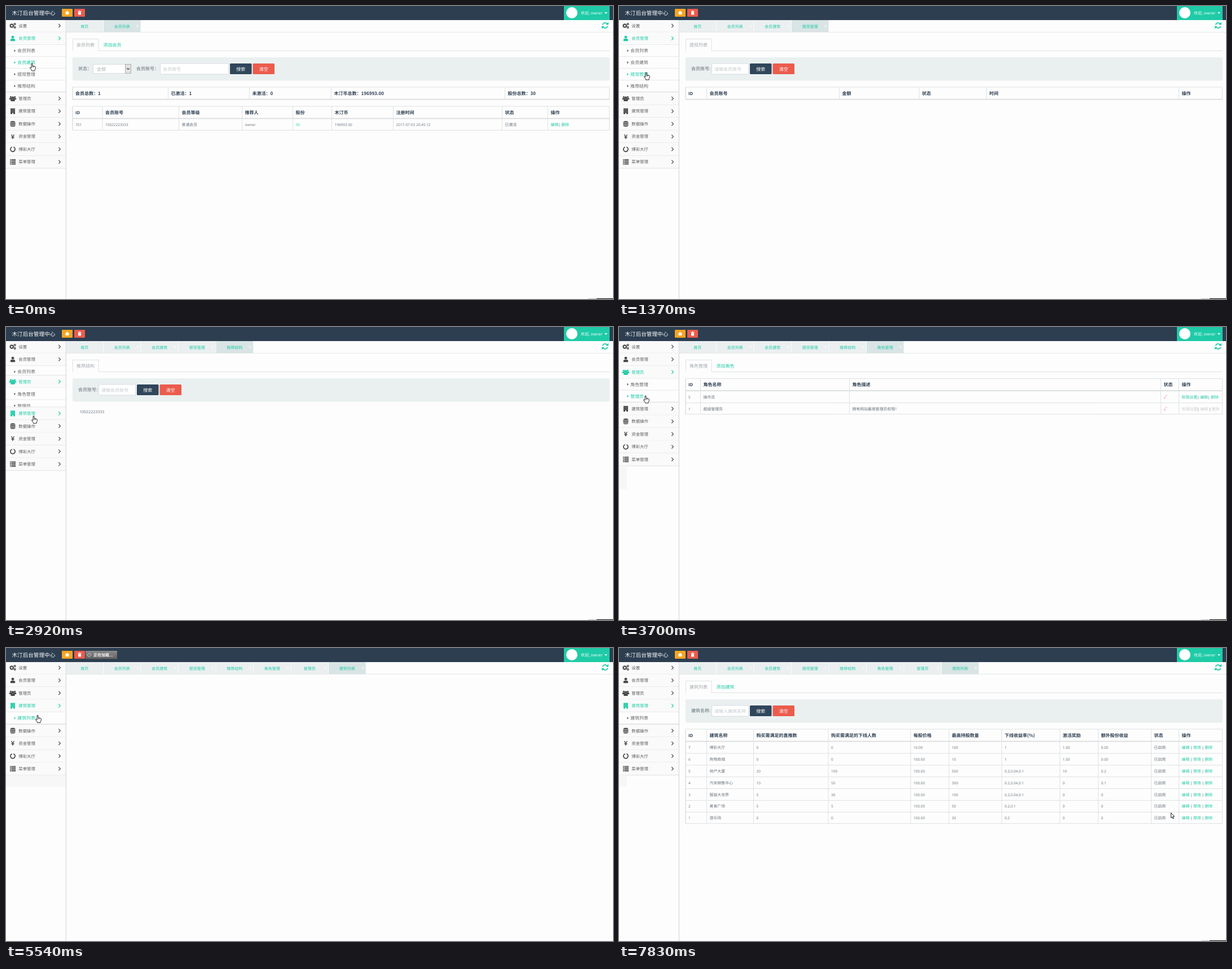
An HTML page with a canvas for the animation above (7990 ms loop, 1076 px wide and 520 px high).

```html
<!DOCTYPE html>
<html lang="zh">
<head>
<meta charset="utf-8">
<title>后台管理</title>
<style>
html, body { margin: 0; width: 1076px; height: 520px; overflow: hidden; background: #fdfdfd; }
canvas { display: block; }
</style>
</head>
<body>
<canvas id="stage" width="1076" height="520"></canvas>
<script>
const ctx = document.getElementById('stage').getContext('2d');
const LOOP = 7990;
const TEAL = '#1fcba7', NAVY = '#2c3e50', RED = '#eb5c4d', LINE = '#dfe1e2', PAPER = '#fdfdfd';
const FONT = '"Noto Sans CJK SC", "Noto Sans CJK", "Open Sans", sans-serif';
const LATIN = '"Open Sans", "Noto Sans", sans-serif';
const PHONE = '10022223333';

const MENU = [
  ['设置'],
  ['会员管理', '会员列表', '会员建筑', '提现管理', '推荐结构'],
  ['管理员', '角色管理', '管理员'],
  ['建筑管理', '建筑列表'],
  ['数据操作'], ['资金管理'], ['博彩大厅'], ['菜单管理']
];
const TABS = ['首页', '会员列表', '会员建筑', '提现管理', '推荐结构', '角色管理', '管理员', '建筑列表'];

// ---- helpers ----
function box(x, y, w, h, fill, stroke, r = 0) {
  ctx.beginPath();
  ctx.roundRect(x, y, w, h, r);
  if (fill) { ctx.fillStyle = fill; ctx.fill(); }
  if (stroke) { ctx.strokeStyle = stroke; ctx.lineWidth = 1; ctx.stroke(); }
}

function line(points, color, width = 1) {
  ctx.beginPath();
  points.forEach(([x, y]) => ctx.lineTo(x, y));
  ctx.strokeStyle = color;
  ctx.lineWidth = width;
  ctx.stroke();
}

function poly(points, fill, stroke) {
  ctx.beginPath();
  points.forEach(([x, y]) => ctx.lineTo(x, y));
  ctx.closePath();
  ctx.fillStyle = fill;
  ctx.fill();
  if (stroke) { ctx.strokeStyle = stroke; ctx.lineWidth = 0.9; ctx.stroke(); }
}

function disc(x, y, r, fill) {
  ctx.beginPath();
  ctx.arc(x, y, r, 0, 7);
  ctx.fillStyle = fill;
  ctx.fill();
}

function arc(x, y, r, from, to, color, width) {
  ctx.beginPath();
  ctx.arc(x, y, r, from, to);
  ctx.strokeStyle = color;
  ctx.lineWidth = width;
  ctx.stroke();
}

function setFont(s, size, bold) {
  const plain = /^[\x20-\x7e]+$/.test(s);
  ctx.font = `${bold ? 'bold ' : ''}${plain ? size * 0.94 : size}px ${plain ? LATIN : FONT}`;
}

// y is the visual middle of the line
function text(s, x, y, size, color, bold = false, align = 'left') {
  setFont(s, size, bold);
  ctx.textAlign = align;
  ctx.fillStyle = color;
  ctx.fillText(s, x, y + size * 0.37);
  return ctx.measureText(s).width;
}

// ---- icons ----
const icons = [
  c => {
    ctx.setLineDash([1.5, 0.9]);
    arc(-1.8, 0, 3.3, 0, 6.3, c, 1.5);
    ctx.setLineDash([]);
    arc(-1.8, 0, 2.4, 0, 6.3, c, 1.6);
    for (const y of [-2.9, 2.9]) arc(3.7, y, 1.4, 0, 6.3, c, 1.3);
  },
  c => person(0, 0, 1, c),
  c => {
    person(-3.6, -1.2, 0.65, c);
    person(3.6, -1.2, 0.65, c);
    person(0, 0.6, 0.9, c);
  },
  c => {
    box(-4, -5, 8, 10, c);
    for (let i = 0; i < 9; i++) box(-2.6 + (i % 3) * 2.1, -3.6 + (i / 3 | 0) * 2.2, 0.9, 0.9, '#ffffff99');
    box(-1, 3, 2, 2, PAPER);
  },
  c => {
    box(-4.5, -5, 9, 10, c, null, 3);
    for (const y of [-2.2, 0.6, 3.1]) line([[-4.5, y - 0.5], [-2, y], [2, y], [4.5, y - 0.5]], PAPER, 0.8);
  },
  c => text('¥', 0, 0, 11, c, true, 'center'),
  c => arc(0, 0, 4.1, -1.25, 4.4, c, 1.7),
  c => {
    for (let y = -4; y < 5; y += 2.6) { box(-5, y - 0.8, 1.7, 1.7, c); box(-2.6, y - 0.8, 7.8, 1.7, c); }
  }
];

function person(x, y, k, c) {
  disc(x, y - 2.3 * k, 2.4 * k, c);
  box(x - 4.2 * k, y + 0.4 * k, 8.4 * k, 4.4 * k, c, null, [2.4 * k, 2.4 * k, k, k]);
}

// ---- frame of the page ----
function header(s) {
  box(0, 0, 1076, 25, NAVY);
  text('木汀后台管理中心', 10.5, 12, 9.6, '#fff');
  box(99, 5, 19, 14, '#f6a523', null, 1);
  poly([[108.5, 8.5], [112.5, 12.2], [111.3, 12.2], [111.3, 15], [105.7, 15], [105.7, 12.2], [104.5, 12.2]], '#fff');
  box(121, 5, 19, 14, RED, null, 1);
  box(128, 10.4, 5, 5, '#fff', null, 0.6);
  box(127.3, 9, 6.4, 0.9, '#fff');
  box(129.3, 8.2, 2.4, 0.9, '#fff');
  if (!s.page) {
    const shade = ctx.createLinearGradient(0, 5, 0, 19);
    shade.addColorStop(0, '#8b8b8b');
    shade.addColorStop(1, '#606060');
    box(141, 5, 56, 14.5, shade);
    for (let i = 0; i < 8; i++) {
      const a = i * Math.PI / 4, dx = Math.cos(a), dy = Math.sin(a);
      line([[147.5 + 2 * dx, 12.5 + 2 * dy], [147.5 + 3.7 * dx, 12.5 + 3.7 * dy]], i % 2 ? '#ddd' : '#fff', 0.9);
    }
    text('正在加载...', 155, 12.5, 7, '#fff', true);
  }
  box(989, 0, 81, 25, TEAL);
  disc(1003, 12, 10, '#fff');
  const w = text('欢迎, ', 1019, 12.5, 7, '#fff');
  text('owner', 1019 + w, 12.5, 7.5, '#fff');
  poly([[1061, 11], [1066, 11], [1063.5, 14]], '#fff');
}

function tabBar(count) {
  for (let i = 0; i < count; i++) {
    const x = 106.5 + i * 66.5;
    box(x, 25, 65.6, 21, i === count - 1 ? '#d9e4e5' : '#ebeff0');
    text(TABS[i], x + 32.8, 36, 7, TEAL, false, 'center');
    if (i) {
      line([[x + 58.5, 33.8], [x + 62, 37.2]], '#fff');
      line([[x + 62, 33.8], [x + 58.5, 37.2]], '#fff');
    }
  }
  line([[107, 46.5], [1076, 46.5]], '#e4e6e7');
  arc(1062, 34.5, 4.6, 3.4, 5.8, TEAL, 1.8);
  arc(1062, 34.5, 4.6, 0.26, 2.7, TEAL, 1.8);
  poly([[1068, 28.5], [1068, 33.2], [1063.3, 33.2]], TEAL);
  poly([[1056, 40.5], [1056, 35.8], [1060.7, 35.8]], TEAL);
}

function sidebar(s) {
  const [mx, my] = s.at;
  const hovered = (top, h) => mx < 106 && my >= top && my < top + h;
  let y = 23.75;
  MENU.forEach(([name, ...subs], i) => {
    const share = s.open[i] || 0;
    const color = share > 0.5 || hovered(y, 22.5) ? TEAL : '';
    box(0, y, 106, 22.5, '#fafafa');
    ctx.save();
    ctx.translate(12, y + 11.25);
    icons[i](color || '#484848');
    ctx.restore();
    text(name, 22.3, y + 11.25, 7.4, color || '#5c5c5c');
    line([[93.3, y + 8], [96.3, y + 11.2], [93.3, y + 14.4]], color || '#484848', 1.2);
    y += 22.5;
    line([[0, y], [106, y]], LINE);
    if (!share) return;
    const h = (subs.length * 20.8 + 1) * share;
    ctx.save();
    ctx.beginPath();
    ctx.rect(0, y, 106, h);
    ctx.clip();
    box(0, y, 106, h, PAPER);
    subs.forEach((sub, k) => {
      const top = y + k * 20.9, mid = top + 10.6, c = hovered(top, 20.9) ? TEAL : '';
      poly([[14.5, mid - 2.2], [17, mid], [14.5, mid + 2.2]], c || '#555');
      text(sub, 20.3, mid, 7.9, c || '#666');
      line([[0, top + 20.9], [106, top + 20.9]], '#e6e7e8');
    });
    ctx.restore();
    y += h;
    line([[0, y], [106, y]], '#ccc');
  });
  if (s.ghost) box(0, s.ghost[0], s.ghost[2], s.ghost[1] - s.ghost[0], '#f7f7f7');
  line([[106.3, 25], [106.3, 520]], '#cfd1d2');
}

// ---- page parts ----
function pageTabs(current, other) {
  const right = 118.5 + current.length * 7.9 + 14;
  line([[118, 79.5], [118.5, 79.5], [118.5, 58.5], [right, 58.5], [right, 79.5], [1070, 79.5]], LINE);
  text(current, 125, 69, 8, '#a3a9ad');
  if (other) text(other, right + 8.5, 69, 8, TEAL);
}

function button(x, label, color) {
  box(x, 102, 38.5, 19, color, null, 1.5);
  text(label, x + 19.3, 111.7, 8, '#fff', false, 'center');
}

function filter(label, hint, x = 128, inputX = 164.5, width = 65) {
  text(label, x, 111.5, 8, '#5f6a72');
  box(inputX, 102, width, 19, '#fff', '#d8dde0', 1);
  text(hint, inputX + 4.5, 112, 8, '#c3c8cb');
  button(inputX + width + 2.5, '搜索', '#30465b');
  button(inputX + width + 43, '清空', RED);
}

function panel() { box(118, 91, 952, 41.5, '#eaf0f0', null, 3); }

// Cell marks: @ link, ~ disabled link, ! alert
const MARKS = { '@': TEAL, '~': '#c9cdcf', '!': '#f0384a' };

function cell(value, x, y, picked) {
  const mark = MARKS[value[0]];
  const body = mark ? value.slice(1) : value;
  if (picked) {
    setFont(body, 6.9);
    box(x, y - 4.6, ctx.measureText(body).width, 9.4, '#0078d7');
  }
  for (const part of body.split(/(\|)/)) {
    const color = picked ? '#fff' : part === '|' ? '#555' : mark || '#66717a';
    x += text(part, x, y, 6.9, color);
  }
}

function table(top, columns, titles, rows = [], selection) {
  const names = titles.split(' ');
  const bottom = top + 21.6 + rows.length * 20.85;
  box(118, top, 951.5, bottom - top, null, LINE);
  columns.forEach(x => line([[x, top], [x, bottom]], LINE));
  names.forEach((name, c) => text(name, (columns[c]) + 5, top + 11, 8, NAVY, true));
  line([[118, top + 21.6], [1070, top + 21.6]], '#d9dcdd', 1.8);
  rows.forEach((row, r) => {
    const mid = top + 32.6 + r * 20.85;
    if (r) line([[118, mid - 10.4], [1070, mid - 10.4]], LINE);
    row.split('/').forEach((value, c) => {
      const index = r * names.length + c;
      const picked = selection && index >= selection[0] && index <= selection[1];
      if (value) cell(value, columns[c] + 5, mid, picked);
    });
  });
}

const pages = {
  members() {
    pageTabs('会员列表', '添加会员');
    panel();
    text('状态：', 128, 111.5, 8, '#5f6a72');
    box(154.5, 103.5, 67, 16, '#fff', '#d8dde0');
    box(211.5, 103.5, 10, 16, '#e3e3e3', '#aaa');
    line([[214, 110.2], [216.5, 112.7], [219, 110.2]], '#444', 1.2);
    text('全部', 161, 112, 8, '#a3a9ad');
    filter('会员账号：', '会员账号', 231, 273.5, 121);
    table(144, [118, 287.5, 431.5, 576.5, 884.5], '会员总数：1 已激活：1 未激活：0 木汀币总数：196993.00 股份总数：30');
    table(178, [118, 171, 306.5, 418.5, 508.5, 577.5, 686.5, 879.5, 960.5],
      'ID 会员账号 会员等级 推荐人 股份 木汀币 注册时间 状态 操作',
      [`701/${PHONE}/普通会员/owner/@30/196993.00/2017-07-03 20:45:12/已激活/@编辑| 删除`]);
  },
  holdings() {
    pageTabs('会员建筑列表');
    panel();
    filter('会员账号:', '请输会员账号');
    const shares = [2, 5, 7, 3, 2, 1, 10];
    const times = ['17 04:56:39', '17 04:56:22', '17 04:56:07', '17 04:56:03', '17 04:55:59', '16 18:17:56'];
    table(144, [118, 155.5, 390.5, 532, 651.5, 992.5], 'ID 会员账号 建筑 股份 时间 操作', shares.map((n, i) =>
      `${7 - i}/${PHONE}/游乐场/${n}/${times[i] ? '2020-02-' + times[i] : '2017-07-03 20:50:33'}/@编辑 | 删除`));
  },
  withdrawals() {
    pageTabs('提现列表');
    panel();
    filter('会员账号:', '请输会员账号');
    table(144, [118, 155.5, 390.5, 532, 651.5, 992.5], 'ID 会员账号 金额 状态 时间 操作');
  },
  referrals() {
    pageTabs('推荐结构');
    panel();
    filter('会员账号:', '请输会员账号');
    text(PHONE, 130, 150, 7.5, '#66717a');
  },
  roles() {
    pageTabs('角色管理', '添加角色');
    table(91.5, [118, 144.5, 408.5, 960.5, 992.5], 'ID 角色名称 角色描述 状态 操作', [
      '5/操作员//!√/@权限设置| 编辑| 删除',
      '1/超级管理员/拥有网站最高管理员权限！/!√/~权限设置| 编辑 | 删除'
    ]);
  },
  managers() {
    pageTabs('管理员', '添加管理员');
    table(91.5, [118, 144.5, 408.5, 651.5, 960.5, 992.5], 'ID 用户名 所属角色 登录时间 状态 操作', [
      '1/owner/超级管理员/2020-02-17 04:50:12/!√/@编辑| 删除'
    ]);
  },
  buildings(selection) {
    pageTabs('建筑列表', '添加建筑');
    panel();
    filter('建筑名称:', '请输入建筑名称');
    table(144, [118, 155.5, 238.5, 371, 517, 585, 678.5, 781.5, 849.5, 943.5, 992.5],
      'ID 建筑名称 购买需满足的直推数 购买需满足的下线人数 每股价格 最高持股数量 下线收益率(%) 激活奖励 额外股份收益 状态 操作', [
        '7/博彩大厅/0/0/10.00/100/1/1.00/0.00',
        '6/购物商城/0/0/100.00/10/1/1.00/0.00',
        '5/地产大厦/20/100/100.00/500/0.2,0.04,0.1/10/0.2',
        '4/汽车销售中心/10/50/100.00/300/0.2,0.04,0.1/0/0.1',
        '3/服装大世界/5/30/100.00/100/0.2,0.04,0.1/0/0',
        '2/美食广场/5/5/100.00/50/0.2,0.1/0/0',
        '1/游乐场/0/0/100.00/30/0.2/0/0'
      ].map(row => row + '/已启用/@编辑 | 禁用 | 删除'), selection);
  }
};

function pointer([x, y]) {
  ctx.save();
  ctx.translate(x, y);
  if (x < 106) {
    poly([[-0.9, 0.2], [0.9, 0.2], [1.1, 4.4], [3, 4.6], [5, 5.2], [6.4, 6.2], [6.2, 9.4], [5, 11.4], [5, 13],
      [-0.4, 13], [-0.8, 11.4], [-3.6, 7.6], [-2.8, 6.6], [-1, 8]], '#fff', '#111');
    for (const dx of [1.3, 3.2]) line([[dx, 4.8], [dx, 7]], '#111', 0.7);
  } else {
    poly([[0.5, 0.5], [0.5, 9.5], [2.5, 7.7], [4, 11], [5.3, 10.4], [3.9, 7.2], [6.6, 7]], '#fff', '#111');
  }
  ctx.restore();
}

// ---- timeline: each step keeps what it does not mention ----
const steps = [
  { t: 0, at: [46, 102], open: { 1: 1 }, tabs: 2, page: 'members' },
  { t: 270, tabs: 3, page: null },
  { t: 410, page: 'holdings' },
  { t: 550, at: [47, 110] },
  { t: 690, at: [48, 118] },
  { t: 1250, tabs: 4, page: null },
  { t: 1370, page: 'withdrawals' },
  { t: 1490, at: [50, 143] },
  { t: 2050, tabs: 5, page: null },
  { t: 2210, page: 'referrals' },
  { t: 2360, at: [49, 158] },
  { t: 2770, open: { 1: 0.7, 2: 0.3 } },
  { t: 2900, open: { 1: 0.2, 2: 0.8 } },
  { t: 3040, open: { 2: 1 }, ghost: [246.5, 288, 105] },
  { t: 3170, at: [48, 101] },
  { t: 3300, tabs: 6, page: null },
  { t: 3430, page: 'roles', ghost: [246.5, 288, 14] },
  { t: 3570, at: [47, 111] },
  { t: 3700, at: [47, 122] },
  { t: 4200, tabs: 7, page: null },
  { t: 4360, page: 'managers' },
  { t: 4520, at: [52, 141] },
  { t: 4680, open: { 2: 0.6, 3: 0.4 }, ghost: null },
  { t: 4840, open: { 2: 0.2, 3: 0.8 } },
  { t: 5000, open: { 3: 1 }, ghost: [225.5, 246.5, 105] },
  { t: 5270, at: [56, 119.5] },
  { t: 5540, tabs: 8, page: null },
  { t: 5660, page: 'buildings', ghost: [225.5, 246.5, 14] },
  { t: 5810, at: [110, 150] },
  { t: 5950, at: [160, 173] },
  { t: 6100, at: [190, 183], selection: [1, 1] },
  { t: 6240, at: [225, 198], selection: [1, 12] },
  { t: 6380, at: [279, 224] },
  { t: 6530, at: [292, 243] }
];
for (let i = 0; i <= 8; i++) {
  const p = i / 8;
  steps.push({ t: 6650 + 1030 * p, at: [300 + 654 * p, 258 + 34 * p + 105 * p * (1 - p)], selection: i ? null : [1, 12] });
}
steps.push({ t: 7830, at: [978, 292] });

const states = [];
for (const step of steps) states.push({ ...states[states.length - 1], ...step });

function draw(time) {
  const s = states.findLast(state => state.t <= time);
  box(0, 0, 1076, 520, PAPER);
  sidebar(s);
  header(s);
  tabBar(s.tabs);
  if (s.page) {
    pages[s.page](s.selection);
    box(1032, 518.8, 15, 1.2, '#c8c8c8');
    box(1047, 518.8, 29, 1.2, '#222');
  }
  pointer(s.at);
}

function tick() {
  draw(performance.now() % LOOP);
  requestAnimationFrame(tick);
}
ctx.textRendering = 'geometricPrecision';
tick();
</script>
</body>
</html>
```
